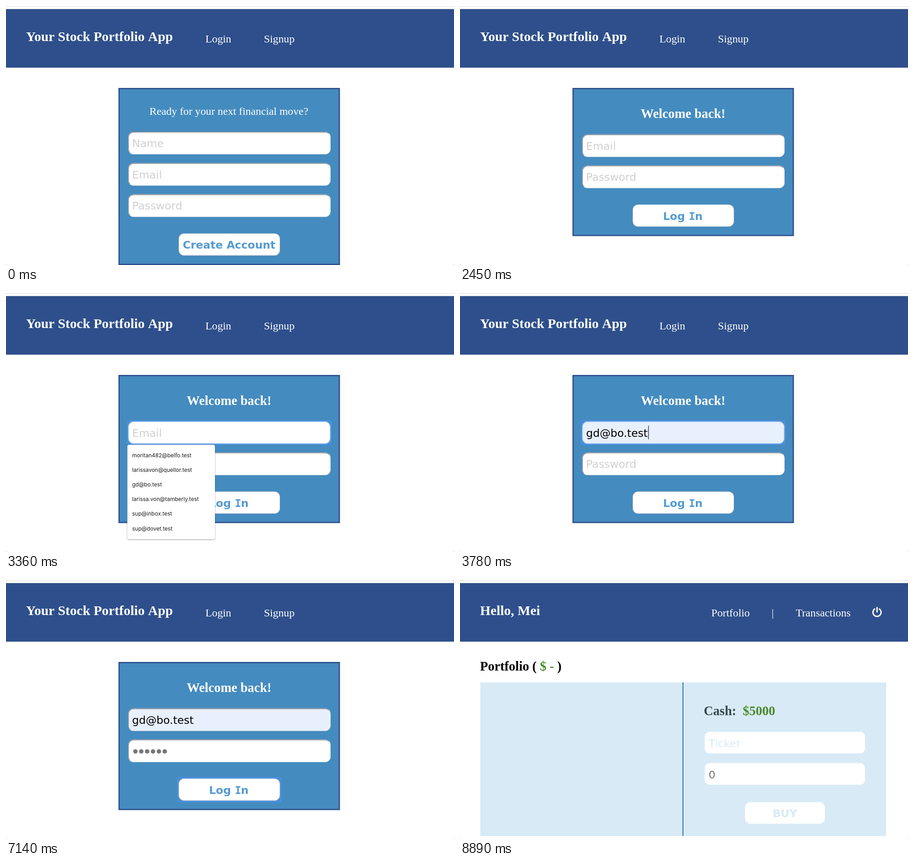
An HTML page with a canvas that plays this animation: 984 by 569 pixels, repeating every 8960 ms.

```html
<!DOCTYPE html>
<html lang="en">
<head>
<meta charset="utf-8">
<title>Stock portfolio login</title>
<style>
html, body { margin: 0; width: 100%; height: 100%; overflow: hidden; background: #fff; }
canvas { display: block; }
</style>
</head>
<body>
<canvas id="stage" width="984" height="569"></canvas>
<script>
const ctx = document.getElementById('stage').getContext('2d');
const LOOP = 8960;
const NAVY = '#2e4f8b', BLUE = '#448bbf', PALE = '#d8eaf6', GREEN = '#4b8a2c';
const SERIF = '"Liberation Serif", serif';
const SANS = '"DejaVu Sans", sans-serif';
const MONO = '"DejaVu Sans Mono", monospace';
const TITLE = 'bold 29.7px ' + SERIF;
const HEAD = 'bold 28.5px ' + SERIF;
const NAV = '23.76px ' + SERIF;
const FIELD = '23.6px ' + SANS;
const STRONG = 'bold 23.6px ' + SANS;

// Moments of the story, in ms
const AT = { login: 1540, email: 2660, filled: 3500, password: 4200, submit: 6860, home: 7350 };
const KEYS = [5040, 5180, 5320, 5530, 5670, 5880];
const EMAIL = 'gd@bo.test';
const SUGGESTIONS = [
  'moritan482@belfo.test', 'larissavon@quellor.test', EMAIL,
  'larissa.von@tamberly.test', 'sup@inbox.test', 'sup@dovet.test'
];

function rect(x, y, w, h, color) {
  ctx.fillStyle = color;
  ctx.fillRect(x, y, w, h);
}

function round(x, y, w, h, r, color) {
  ctx.fillStyle = color;
  ctx.beginPath();
  ctx.roundRect(x, y, w, h, r);
  ctx.fill();
}

function text(str, x, y, font, color, align = 'left') {
  ctx.font = font;
  ctx.fillStyle = color;
  ctx.textAlign = align;
  ctx.fillText(str, x, y);
}

function ring(x, y, w, h) {
  ctx.strokeStyle = '#4a90e2';
  ctx.lineWidth = 3;
  ctx.beginPath();
  ctx.roundRect(x, y, w, h, 2);
  ctx.stroke();
}

function input(y, { label, focus, fill = '#fff' }) {
  if (focus) {
    ring(267.5, y - 0.5, 446, 51);
    round(268, y, 445, 50, 12, '#8db8ec');
    round(269.5, y + 1.5, 442, 47, 11, fill);
  } else {
    round(268, y, 445, 50, 12, '#dfe3e8');
    ctx.save();
    ctx.beginPath();
    ctx.moveTo(268, y + 50);
    ctx.lineTo(268, y);
    ctx.lineTo(713, y);
    ctx.lineTo(705, y + 8);
    ctx.lineTo(276, y + 42);
    ctx.clip();
    round(268, y, 445, 50, 12, '#8e939c');
    ctx.restore();
    round(269.7, y + 2, 442.3, 47, 11, fill);
  }
  if (label) text(label, 277, y + 33.8, FIELD, '#d0d0d0');
}

function button(y, focus) {
  if (focus) ring(377.5, y - 1.5, 226, 52);
  round(379, y, 223, 49, 12, '#b3bcc6');
  round(380, y + 0.7, 221, 47.3, 11.5, '#fff');
}

function caret(x, y, since, t, color) {
  if ((t - since) % 1000 < 500) rect(x, y, 1.3, 30, color);
}

function bar() {
  rect(0, 0, 984, 569, '#fff');
  rect(0, 0, 984, 1, '#dcdcdf');
  rect(0, 7, 984, 128.5, NAVY);
  rect(0, 6, 984, 1, '#c9cbd0');
}

function guestBar() {
  bar();
  text('Your Stock Portfolio App', 44, 77, TITLE, '#fff');
  text('Login', 438, 80, NAV, '#fff');
  text('Signup', 566.5, 80, NAV, '#fff');
}

function card(h) {
  rect(247, 180, 486.5, h, NAVY);
  rect(249.7, 182.8, 481, h - 5.5, BLUE);
}

function signupPage() {
  guestBar();
  card(389);
  text('Ready for your next financial move?', 489.5, 238.5, NAV, '#fff', 'center');
  ['Name', 'Email', 'Password'].forEach((label, i) => input(276 + i * 68.7, { label }));
  button(499.5);
  text('Create Account', 490, 533, STRONG, '#549bd2', 'center');
}

function dropdown() {
  ctx.save();
  ctx.shadowColor = 'rgba(0,0,0,.4)';
  ctx.shadowBlur = 3;
  ctx.shadowOffsetY = 1;
  round(266.5, 333.5, 192.5, 207.5, 4, '#fff');
  ctx.restore();
  SUGGESTIONS.forEach((s, i) =>
    text(s, 277, 361 + i * 32.1, '12px Inter, sans-serif', '#1c1c1c'));
}

function loginPage(t) {
  const filled = t >= AT.filled;
  const onEmail = t >= AT.email && t < AT.password;
  const onPass = t >= AT.password && t < AT.submit;
  const typed = KEYS.filter(k => k <= t);
  guestBar();
  card(325.5);
  text('Welcome back!', 490, 246, HEAD, '#fff', 'center');

  input(281.7, { label: filled ? '' : 'Email', focus: onEmail, fill: filled ? '#e8f0fd' : '#fff' });
  if (filled) text(EMAIL, 277, 315.5, FIELD, '#000');
  if (onEmail) {
    ctx.font = FIELD;
    const end = filled ? 278 + ctx.measureText(EMAIL).width : 277;
    caret(end, 291.5, filled ? AT.filled : AT.email, t, '#222');
  }

  input(350.3, { label: typed.length ? '' : 'Password', focus: onPass });
  typed.forEach((_, i) => {
    ctx.fillStyle = '#777';
    ctx.beginPath();
    ctx.arc(284.2 + i * 12.9, 376.6, 4.9, 0, 7);
    ctx.fill();
  });
  if (onPass) {
    const last = typed.length ? typed[typed.length - 1] : AT.password;
    caret(278.5 + typed.length * 12.9, 360.5, last, t, '#777');
  }

  button(436, t >= AT.submit);
  text('Log', 446, 469.7, STRONG, '#549bd2');
  text('I', 502.5, 469.7, 'bold 23.6px ' + MONO, '#549bd2');
  text('n', 516, 469.7, STRONG, '#549bd2');

  if (onEmail && !filled) dropdown();
}

function power(x, y) {
  ctx.strokeStyle = '#fff';
  ctx.lineWidth = 3;
  ctx.lineCap = 'round';
  ctx.beginPath();
  ctx.arc(x, y + 1, 9, -0.95, Math.PI + 0.95);
  ctx.moveTo(x, y - 9.5);
  ctx.lineTo(x, y);
  ctx.stroke();
  ctx.lineCap = 'butt';
}

function homePage() {
  bar();
  text('Hello, Mei', 44, 77, TITLE, '#fff');
  text('Portfolio', 552, 80, NAV, '#fff');
  text('|', 684.6, 80, NAV, '#fff');
  text('Transactions', 737.5, 80, NAV, '#fff');
  power(916, 70);

  text('Portfolio (', 44, 199, HEAD, '#000');
  text('$ -', 175.5, 199, HEAD, GREEN);
  text(')', 213.5, 199, HEAD, '#000');

  rect(44.5, 225, 891.5, 337.5, PALE);
  rect(488.5, 225, 2.5, 337.5, '#4a86b0');
  text('Cash:', 535.5, 297, HEAD, '#36474f');
  text('$5000', 621, 297, HEAD, GREEN);
  round(537.5, 333.5, 352, 47.5, 11, '#fff');
  text('Ticker', 546, 366.5, FIELD, PALE);
  round(537.5, 402.3, 352, 47.5, 11, '#fff');
  text('0', 546, 435.5, FIELD, '#777');
  round(626, 488, 175.5, 47.5, 12, '#fff');
  text('BUY', 713.5, 520.5, STRONG, PALE, 'center');
}

// Dark pixels left by the rounded window corners
function corners() {
  for (const x of [0, 983]) for (const y of [0, 568]) rect(x, y, 1, 1, '#555');
}

function draw(t) {
  if (t < AT.login) signupPage();
  else if (t < AT.home) loginPage(t);
  else homePage();
  corners();
}

const start = performance.now();
function tick() {
  draw((performance.now() - start) % LOOP);
  requestAnimationFrame(tick);
}
tick();
</script>
</body>
</html>
```
